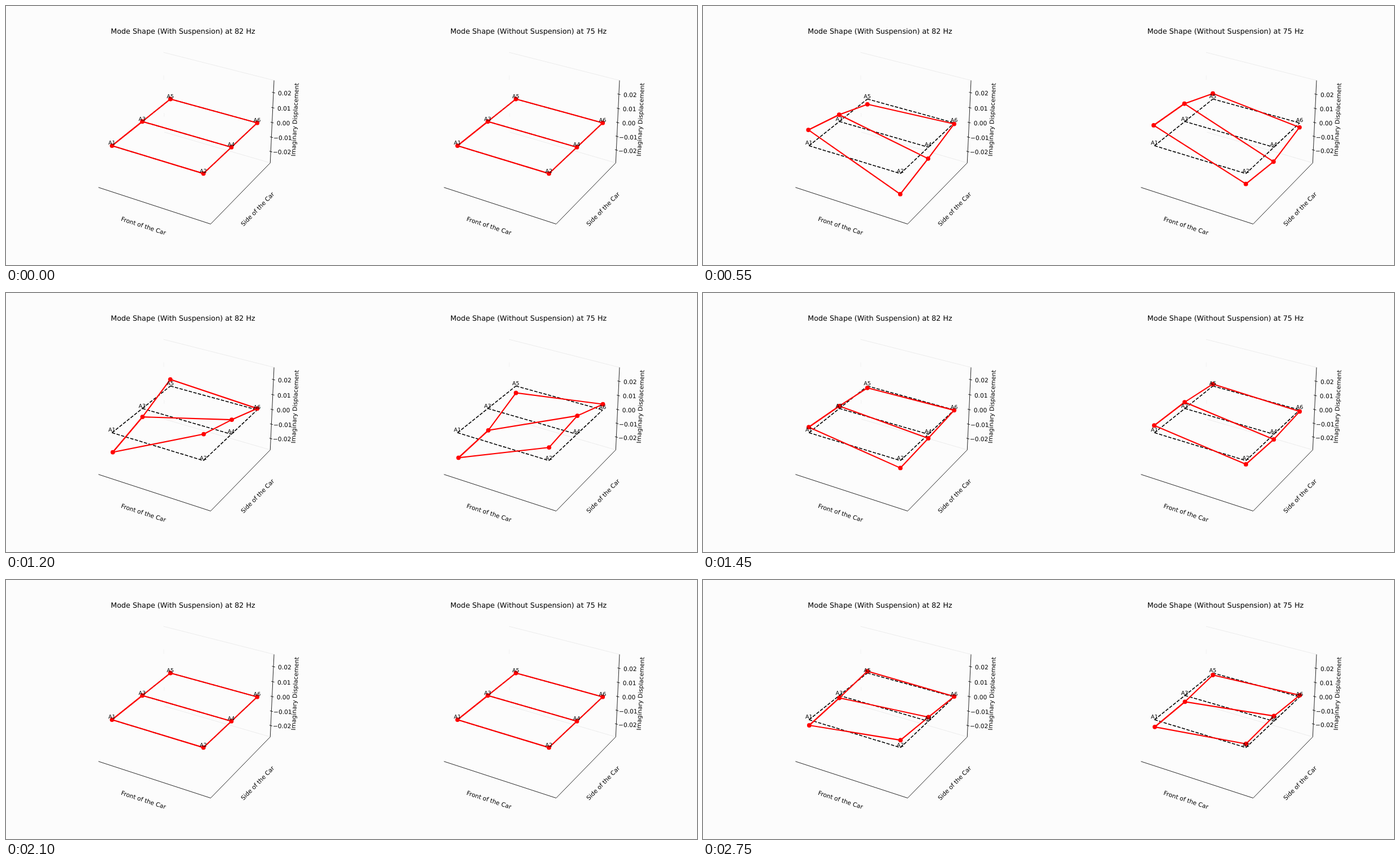
These frames come from a looping animation (1222x458 px, 2.8 s). An HTML page:

```html
<!DOCTYPE html>
<html lang="en">
<head>
<meta charset="utf-8">
<title>Mode shapes</title>
<style>
  html, body { margin: 0; width: 100%; height: 100%; overflow: hidden; background: #fcfcfc; }
  svg { display: block; width: 1222px; height: 458px; }
  text { font: 10.6px "DejaVu Sans", sans-serif; text-anchor: middle; text-rendering: geometricPrecision; }
  .title { font-size: 12.73px; }
  .tag { font-size: 9.55px; }
  line { stroke: #000; stroke-width: .85; }
  .pane { stroke: #e9e9e9; }
  .hint { stroke: #efefef; }
  .rest { stroke-width: 1.59; stroke-dasharray: 5.88 2.54; }
  .bar { stroke: #f00; stroke-width: 2.15; stroke-linecap: square; }
  circle { fill: #f00; }
</style>
</head>
<body>
<svg id="stage" viewBox="0 0 1222 458"></svg>
<script>
const STEP = 50, STEPS = 28;          // one oscillation = 28 steps of 50 ms
const SCALE = 113.65, DIST = 16.8, CX = 318.2, CY = 226.5;
const X = 0.8, Y = 0.8727, TOP = 0.75;

const points = [[-X, -Y], [X, -Y], [-X, 0], [X, 0], [-X, Y], [X, Y]];
const edges = [[0, 1], [2, 3], [4, 5], [0, 2], [2, 4], [1, 3], [3, 5], [0, 2]];

const panels = [
  { left: 0, title: "Mode Shape (With Suspension) at 82 Hz", tick: 0.268,
    amp: [0.447, -0.576, 0.197, -0.326, -0.158, -0.031] },
  { left: 611, title: "Mode Shape (Without Suspension) at 75 Hz", tick: 0.2535,
    amp: [0.576, -0.288, 0.515, -0.414, 0.165, -0.131] }
];

// Perspective view: azimuth -60 deg, elevation 30 deg.
function project(x, y, z) {
  const r = Math.sqrt(3) / 2;
  const k = SCALE / (1 - (r / 2 * x - 0.75 * y + 0.5 * z) / DIST);
  return [CX + k * (r * x + 0.5 * y), CY - k * (-0.25 * x + r / 2 * y + r * z)];
}

function add(parent, tag, attrs, content) {
  const el = document.createElementNS("http://www.w3.org/2000/svg", tag);
  for (const key in attrs) el.setAttribute(key, attrs[key]);
  if (content) el.textContent = content;
  return parent.appendChild(el);
}

function setLine(el, [x1, y1], [x2, y2]) {
  Object.entries({ x1, y1, x2, y2 }).forEach(([key, v]) => el.setAttribute(key, v.toFixed(2)));
}

function addLine(parent, a, b, cls = "axis") {
  const el = add(parent, "line", { class: cls });
  setLine(el, a, b);
  return el;
}

function addLabel(parent, str, x, y, angle, drop) {
  add(parent, "text", { y: drop, transform: `translate(${x} ${y}) rotate(${angle})` }, str);
}

function drawFrame(g, tick) {
  const corner = (x, y, z) => project(x, y, z * TOP);
  addLine(g, corner(-1, 1, 1), corner(1, 1, 1), "pane");
  addLine(g, corner(-1, 1, -1), corner(1, 1, -1), "pane");
  addLine(g, project(-1, 1, 0.33), project(-1, 1, 0.25), "hint");
  addLine(g, project(-1, 1, -0.38), project(-1, 1, -0.45), "hint");

  addLine(g, corner(-1, -1, -1), corner(1, -1, -1));
  addLine(g, corner(1, -1, -1), corner(1, 1, -1));
  addLine(g, corner(1, 1, -1), corner(1, 1, 1));

  for (let i = -2; i <= 2; i++) {
    const z = i * tick, [x, y] = project(1, 1, z);
    addLine(g, project(0.975, 1, z), project(1.028, 1, z));
    const str = (i < 0 ? "\u2212" : "") + (Math.abs(i) / 100).toFixed(2);
    add(g, "text", { x: x + 19.9, y: y + 5.1 }, str);
  }
  addLabel(g, "Front of the Car", 243.2, 388.6, 18, 3.9);
  addLabel(g, "Side of the Car", 444.8, 359, -45.8, 3.9);
  addLabel(g, "Imaginary Displacement", 511.8, 201, -87.3, 2.9);
}

function buildPanel({ left, title, tick, amp }) {
  const g = add(document.getElementById("stage"), "g", { transform: `translate(${left} 0)` });
  const rest = points.map(([x, y]) => project(x, y, 0));
  add(g, "text", { class: "title", x: 313, y: 48.8 }, title);
  drawFrame(g, tick);
  edges.slice(0, 7).forEach(([a, b]) => addLine(g, rest[a], rest[b], "rest"));
  const bars = edges.map(([a, b]) => addLine(g, rest[a], rest[b], "bar"));
  const dots = rest.map(() => add(g, "circle", { r: 3.9 }));
  rest.forEach(([x, y], i) => add(g, "text", { class: "tag", x: x - 0.2, y: y - 1.7 }, "A" + (i + 1)));

  return swing => {
    const pos = points.map(([x, y], i) => project(x, y, amp[i] * swing));
    edges.forEach(([a, b], i) => setLine(bars[i], pos[a], pos[b]));
    dots.forEach((dot, i) => {
      dot.setAttribute("cx", pos[i][0].toFixed(2));
      dot.setAttribute("cy", pos[i][1].toFixed(2));
    });
  };
}

const updates = panels.map(buildPanel);
const start = performance.now();

function render() {
  const step = Math.floor(Math.max(0, performance.now() - start) / STEP) % STEPS;
  const swing = Math.sin(2 * Math.PI * step / STEPS);
  updates.forEach(update => update(swing));
  requestAnimationFrame(render);
}
render();
</script>
</body>
</html>
```
